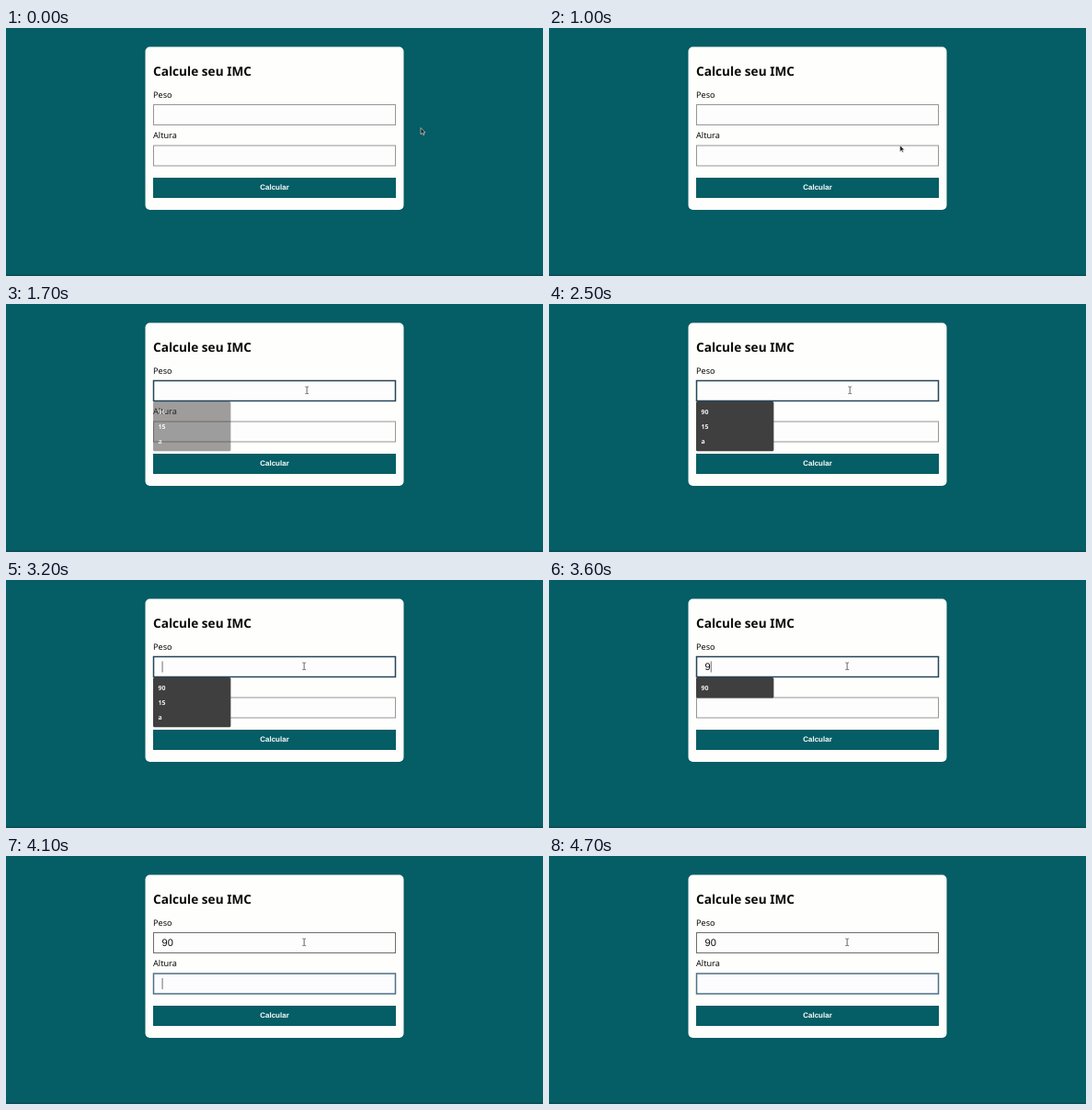
An HTML page that plays this animation: 584 by 270 pixels, repeating every 5000 ms.

```html
<!DOCTYPE html>
<html lang="pt-BR">
<head>
<meta charset="utf-8">
<title>IMC</title>
<style>
  html, body { margin: 0; width: 100%; height: 100%; overflow: hidden; background: #055d65; }
  svg { display: block; width: 584px; height: 270px; text-rendering: geometricPrecision; }
  text { font: 9.15px "Noto Sans", "Open Sans", sans-serif; fill: #0b0b0b; }
  .title { font-size: 13.65px; font-weight: 700; }
  .value { font: 11px "Liberation Sans", Arial, sans-serif; }
  .button { font: bold 8px "Liberation Sans", Arial, sans-serif; fill: #fff; text-anchor: middle; }
  #list text { font-size: 6.9px; font-weight: 600; fill: #f4f4f4; }
  .field { fill: #fdfdfd; stroke: #969696; stroke-width: 1; }
  .field.hover { stroke: #6c6c6c; }
  .field.focus { stroke: #24445a; stroke-width: 1.5; }
  #height.focus { stroke: #4d7186; fill: #fcfcff; }
</style>
</head>
<body>
<svg viewBox="0 0 584 270">
  <rect width="584" height="270" fill="#055d65"/>
  <rect y="268.5" width="584" height="1.5" fill="#0a4c54"/>
  <rect x="151.5" y="20.5" width="281" height="177.4" rx="5" fill="#fefefc"/>
  <text class="title" x="160" y="52.3">Calcule seu IMC</text>
  <text x="160" y="75.6">Peso</text>
  <text x="160" y="120.1">Altura</text>
  <rect id="weight" class="field" x="160.5" y="83.5" width="263" height="22"/>
  <rect id="height" class="field" x="160.5" y="128" width="263" height="22"/>
  <rect x="160" y="163" width="264" height="22" fill="#055d65"/>
  <text class="button" x="292" y="176.3">Calcular</text>
  <text id="typed" class="value" x="169.6" y="98.3"></text>
  <rect id="caret" width=".7" height="12" fill="#333"/>
  <g id="list">
    <rect id="panel" fill="#403f3f" rx="1.5"/>
    <text x="165.6" y="120">90</text>
    <g id="rest">
      <text x="165.6" y="135.8">15</text>
      <text x="165.6" y="151.6">a</text>
    </g>
  </g>
  <path id="arrow" d="M0 0V7.2L1.7 5.7 2.8 8 3.9 7.5 2.9 5.2H5Z" fill="#222" stroke="#eee" stroke-width=".6"/>
  <path id="beam" d="M-1.8-3.8H-.5L0-3.3.5-3.8H1.8M0-3.3V3.3M-1.8 3.8H-.5L0 3.3.5 3.8H1.8" fill="none" stroke="#444" stroke-width=".8"/>
</svg>
<script>
const LOOP = 5000, STEP = 100;
const $ = id => document.getElementById(id);
const show = (id, on) => $(id).style.display = on ? "" : "none";
const set = (id, attrs) => Object.entries(attrs).forEach(([k, v]) => $(id).setAttribute(k, v));

// time, x, y of the pointer
const path = [
  [0, 451, 108.6], [800, 451, 108.6], [900, 426, 116], [1000, 381.6, 127.6],
  [1100, 354, 117], [1200, 339, 105], [1300, 331, 98], [1400, 327.2, 93.8],
  [2700, 327.2, 93.8], [2900, 324.2, 93.8], [LOOP, 324.2, 93.8]
];

function pointer(t) {
  const i = path.findIndex(p => p[0] > t);
  const [a, b] = [path[i - 1], path[i]];
  const k = (t - a[0]) / (b[0] - a[0]);
  return [a[1] + (b[1] - a[1]) * k, a[2] + (b[2] - a[2]) * k];
}

function draw(now) {
  const t = Math.floor(now % LOOP / STEP) * STEP;
  const [x, y] = pointer(t);
  const over = y > 83 && y < 106 && x < 424;
  const focus = t < 1700 ? "" : t < 4100 ? "weight" : "height";

  for (const id of ["weight", "height"]) {
    $(id).classList.toggle("hover", id === "weight" && over);
    $(id).classList.toggle("focus", id === focus);
  }

  const text = t < 3400 ? "" : t < 3700 ? "9" : "90";
  $("typed").textContent = text;

  // the caret blink restarts on every focus change or key press
  const since = t - [1800, 3400, 3700, 4100].filter(s => s <= t).pop();
  show("caret", since % 1000 < 500);
  const onHeight = focus === "height";
  set("caret", { x: 169.7 + (onHeight ? 0 : text.length * 6.12), y: onHeight ? 133 : 88.5 });

  const full = t < 3500, fading = t >= 3800;
  show("list", t >= 1700 && t < 3900);
  show("rest", full);
  set("list", { opacity: t < 1800 ? .5 : fading ? .36 : 1 });
  set("panel", {
    x: fading ? 161.5 : 160, y: 106,
    width: fading ? 81.5 : 84.4, height: full ? 54.3 : 22.6
  });

  show("arrow", !over);
  show("beam", over);
  set(over ? "beam" : "arrow", { transform: `translate(${x} ${y})` });
}

const start = performance.now();
function tick() {
  draw(performance.now() - start);
  requestAnimationFrame(tick);
}
tick();
</script>
</body>
</html>
```
